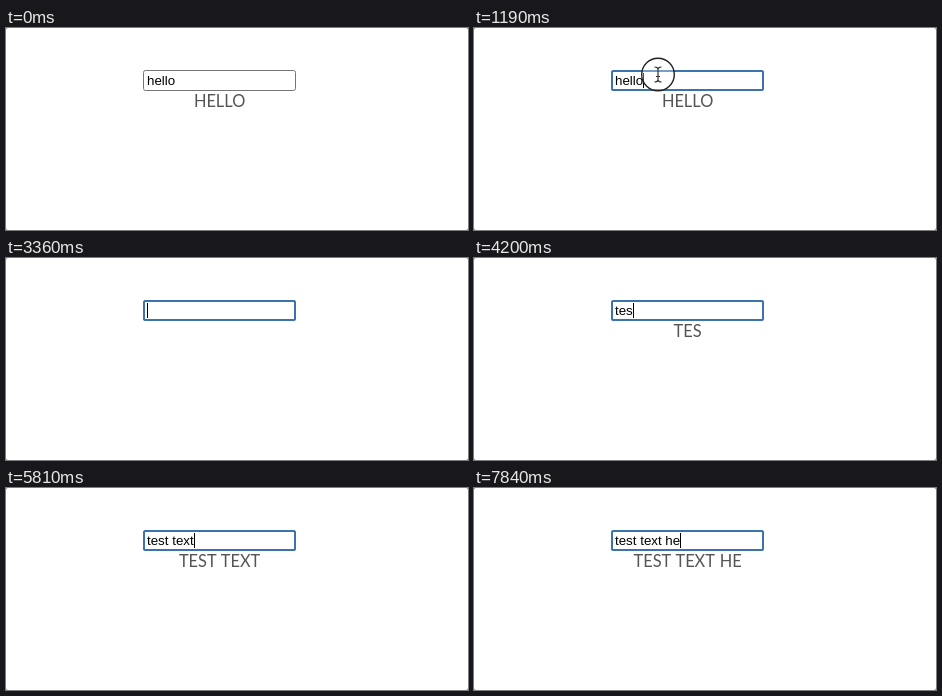
An HTML page that plays this animation: 462x202 px, repeating every 8 s.

```html
<!DOCTYPE html>
<html lang="en">
<head>
<meta charset="utf-8">
<title>Uppercase input</title>
<style>
  html, body { margin: 0; width: 100%; height: 100%; overflow: hidden; background: #777; }
  svg { display: block; width: 462px; height: 202px; background: #fff; border-radius: 2px; }
  text { white-space: pre; }
  #typed { font: 13.333px "Liberation Sans", Arial, sans-serif; fill: #000; }
  #upper { font: 16.4px Lato, sans-serif; word-spacing: 1px; fill: #555; text-anchor: middle; }
  #field { fill: #fff; stroke: #767676; stroke-width: 1; }
  #ring { fill: none; stroke: #3b74ad; stroke-width: 2; }
</style>
</head>
<body>
<svg viewBox="0 0 462 202">
  <rect id="field" x="137.5" y="42.5" width="152" height="20" rx="2"/>
  <rect id="ring" x="138" y="43" width="151" height="19" rx="1.5"/>
  <text id="typed" x="141" y="57"></text>
  <rect id="caret" y="45" width="1" height="15"/>
  <text id="upper" x="213.6" y="79.3"></text>
  <g id="pointer">
    <circle id="click" r="16.3" fill="#fff" fill-opacity=".3" stroke="#222" stroke-width="1.4"/>
    <path id="beam" d="M-3.5-7.5Q-.5-7.5 0-5.5Q.5-7.5 3.5-7.5M0-5.5V5.5M-3.5 7.5Q-.5 7.5 0 5.5Q.5 7.5 3.5 7.5M-2 2H2"
          fill="none" stroke="#333" stroke-width="1.2"/>
    <path id="arrow" d="M0 0V14L3.2 11L5.4 16.2L7.8 15.2L5.6 10.2H10Z" stroke="#fff"/>
  </g>
</svg>
<script>
const LOOP = 8000, TICK = 70;
const FOCUS = 1190, MOVE_FROM = 70, MOVE_TO = 980, HIDE = 1960;

// [time, text, caret shown]
const steps = [
  [0, "hello", 0], [FOCUS, "hello", 1], [1750, "hello", 0],
  [1960, "hell", 1], [2170, "hel", 1], [2380, "he", 1], [2590, "h", 1],
  [2800, "", 0], [3360, "", 1],
  [3850, "t", 1], [3990, "te", 1], [4200, "tes", 1], [4340, "test", 1],
  [4760, "test ", 1], [5180, "test t", 1], [5390, "test te", 1],
  [5530, "test tex", 1], [5810, "test text", 1], [6230, "test text ", 1],
  [6790, "test text ", 0], [7280, "test text h", 1],
  [7770, "test text h", 0], [7840, "test text he", 1]
];

const el = id => document.getElementById(id);
const [ring, typed, caret, upper, pointer, click, beam, arrow] =
  ["ring", "typed", "caret", "upper", "pointer", "click", "beam", "arrow"].map(el);
const show = (node, on) => node.setAttribute("visibility", on ? "visible" : "hidden");

function drawPointer(t) {
  const on = t >= MOVE_FROM && t < HIDE;
  const p = Math.min(1, Math.max(0, (t - MOVE_FROM) / (MOVE_TO - MOVE_FROM)));
  const k = 1 - (1 - p) ** 2;
  const x = 278 + (184 - 278) * k, y = 99 + (46.5 - 99) * k;
  pointer.setAttribute("transform", `translate(${x} ${y})`);
  const inside = y < 63;
  show(beam, on && inside);
  show(arrow, on && !inside);
  show(click, t >= FOCUS && t < FOCUS + TICK);
}

function draw(t) {
  const [, text, blink] = steps.findLast(s => s[0] <= t);
  if (typed.textContent !== text) {
    typed.textContent = text;
    upper.textContent = text.trim().toUpperCase();
  }
  const width = text ? typed.getComputedTextLength() : 0;
  caret.setAttribute("x", Math.round(141 + width));
  show(caret, blink);
  show(ring, t >= FOCUS);
  drawPointer(Math.floor(t / TICK) * TICK);
}

const start = performance.now();
function frame() {
  draw((performance.now() - start) % LOOP);
  requestAnimationFrame(frame);
}
frame();
</script>
</body>
</html>
```
